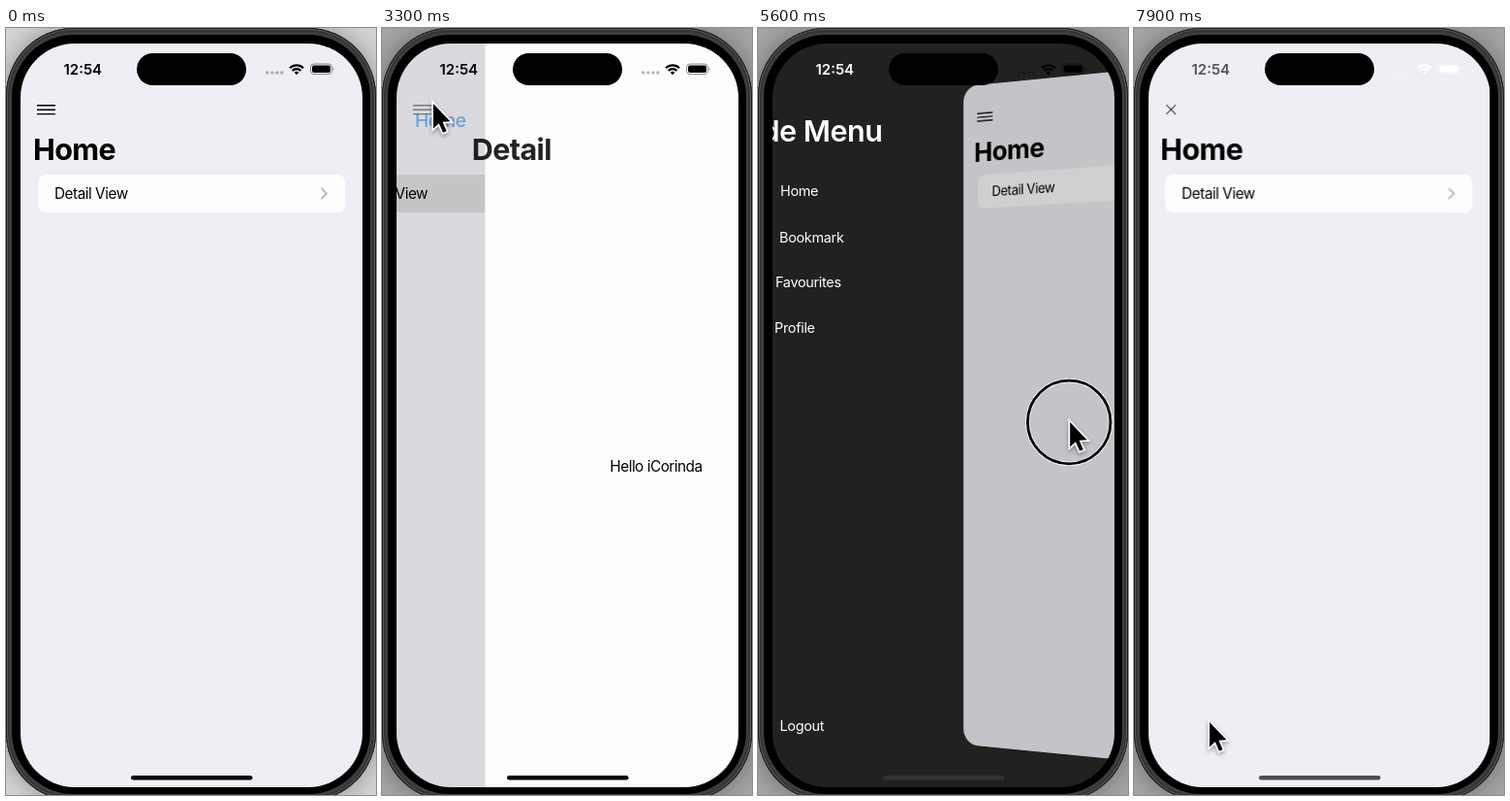
Animation of 382x790 px, one loop 8000 ms. Source, as an HTML page:

```html
<!DOCTYPE html>
<html lang="en">
<head>
<meta charset="utf-8">
<title>Side menu</title>
<style>
  html, body { margin: 0; width: 100%; height: 100%; overflow: hidden; }
  #stage { position: relative; width: 382px; height: 790px; overflow: hidden; }
  #stage > *, #screen > * { position: absolute; left: 0; top: 0; }
  svg { display: block; width: 382px; height: 790px; }
  text { font-family: Inter, "Liberation Sans", sans-serif; font-size: 15.3px; letter-spacing: -.03em; }
  .title { font-size: 30.5px; font-weight: 700; letter-spacing: -.02em; }
  #menu text { fill: #fff; font-size: 14.4px; letter-spacing: -.02em; }
  #menu .title { font-size: 30.5px; font-weight: 600; letter-spacing: -.015em; }
  #device { left: 0; top: 0; width: 382px; height: 796px; border-radius: 70px; background: #3d3e40;
    box-shadow: 0 0 28px rgba(0,0,0,.35), inset 0 0 0 1px #1c1c1e, inset 0 0 0 2px #59595b, inset 0 0 0 4px #333436; }
  #device div { position: absolute; left: 6px; top: 7px; width: 370px; height: 782px; border-radius: 64px; background: #000; }
  #screen { width: 382px; height: 790px; background: #20221f; clip-path: inset(16px 14px 8px 15px round 56px); }
  #page { transform-origin: 15px 399px; }
</style>
</head>
<body>
<div id="stage">
  <div id="device"><div></div></div>
  <div id="screen">
    <svg>
      <g id="menu" fill="#fff">
        <text class="title" x="27.5" y="116.5">Side Menu</text>
        <text x="74" y="173">Home</text>
        <text x="73" y="220.5">Bookmark</text>
        <text x="69" y="266.5">Favourites</text>
        <text x="68" y="314">Profile</text>
        <text x="73.5" y="724">Logout</text>
        <path d="M36 168L46 159.5L56 168V180.5H36ZM53.5 156h3.2v8l-3.2-3z"/>
        <path d="M32.5 167L46 155.5L59.5 167" fill="none" stroke="#fff" stroke-width="2.4" stroke-linecap="round"/>
        <rect x="43" y="170" width="6" height="9" fill="#20221f"/>
        <path d="M31 206Q38 201 44.8 206V227Q38 223 31 226ZM60 206Q53 201 46.2 206V227Q53 223 60 226Z"/>
        <path d="M43.5 273C36 267 31 262 31 256.5C31 251.5 35 249.5 37.5 249.5C40.5 249.5 42.5 251.5 43.5 253.5C44.5 251.5 46.5 249.5 49.5 249.5C52 249.5 56 251.5 56 256.5C56 262 51 267 43.5 273Z"/>
        <circle cx="43" cy="308.5" r="11.7" fill="none" stroke="#fff" stroke-width="2"/>
        <circle cx="43" cy="305.5" r="4.2"/>
        <path d="M34.5 316.5C36 311.5 50 311.5 51.5 316.5A11.5 11.5 0 0 1 34.5 316.5Z"/>
        <rect x="31" y="705" width="21" height="27" rx="4"/>
        <g fill="none" stroke-width="2" stroke-linecap="round" stroke-linejoin="round">
          <path d="M43 718.5H51" stroke="#20221f"/>
          <path d="M53 718.5H59.5M55.5 714l4.5 4.5-4.5 4.5" stroke="#fff"/>
        </g>
      </g>
    </svg>
    <svg id="page">
      <rect x="15" y="16" width="353" height="766" fill="#efeef4"/>
      <g id="content">
        <g id="list">
          <rect id="row" x="33" y="151" width="317" height="39" rx="8"/>
          <text x="50" y="176.3">Detail View</text>
          <path d="M326 165.5l5 5-5 5" fill="none" stroke="#b9b9bd" stroke-width="1.8" stroke-linecap="round" stroke-linejoin="round"/>
        </g>
        <rect id="dim" x="15" y="16" width="353" height="766"/>
        <g id="detail">
          <rect x="15" y="16" width="353" height="766" fill="#fdfdfd"/>
          <text x="191.5" y="456.5" text-anchor="middle">Hello iCorinda</text>
        </g>
        <text id="detailTitle" class="title" y="136">Detail</text>
        <g fill="none" stroke="#000" stroke-width="1.4">
          <path id="bars" d="M32 79.8h19M32 84.2h19M32 88.6h19"/>
          <path id="cross" d="M-7.5-7.5l15 15M7.5-7.5l-15 15"/>
          <path id="back" d="M30 77l-7 7 7 7" stroke="#007aff" stroke-width="2" stroke-linecap="round"/>
        </g>
        <text id="homeTitle" class="title">Home</text>
      </g>
      <rect id="shade" x="15" y="16" width="353" height="766"/>
    </svg>
    <svg>
      <text id="clock" x="79.3" y="47.8" text-anchor="middle" style="font-weight:600;font-size:15px;letter-spacing:0">12:54</text>
      <rect x="135" y="26" width="113" height="33" rx="16.5"/>
      <g id="status">
        <g opacity=".27"><circle cx="269.7" cy="46" r="1.8"/><circle cx="274.8" cy="46" r="1.8"/><circle cx="279.8" cy="46" r="1.8"/><circle cx="284.8" cy="46" r="1.8"/></g>
        <path d="M293 41.2a10 10 0 0 1 14 0M295.6 44a6.2 6.2 0 0 1 8.8 0" fill="none" stroke="currentColor" stroke-width="2.1"/>
        <path d="M300 48.2l-2.3-2.4a3.3 3.3 0 0 1 4.6 0z"/>
        <g opacity=".45"><rect x="314.5" y="37" width="22" height="10.6" rx="3.4" fill="none" stroke="currentColor"/><path d="M337.7 40.5q1.8 1.8 0 3.6z"/></g>
        <rect x="316" y="38.5" width="19" height="7.6" rx="2"/>
      </g>
      <rect id="bar" x="129" y="770" width="125.5" height="4.6" rx="2.3"/>
    </svg>
  </div>
  <svg>
    <g id="cursor">
      <g id="ring" fill="none">
        <circle r="42.8" stroke="#fff" stroke-width="4.6" opacity=".8"/>
        <circle r="42.8" stroke="#000" stroke-width="2.8"/>
      </g>
      <path d="M1 0V25.5L6.8 20.2L11 29.8L14.6 28.2L10.5 18.8L18.5 18.3Z" stroke="#fff" stroke-width="3.4" paint-order="stroke"
        style="filter:drop-shadow(0 2px 2px rgba(0,0,0,.35))"/>
    </g>
  </svg>
</div>
<script>
const LOOP = 8000, PUSH = 2060, POP = 3247;
const el = id => document.getElementById(id);
const set = (id, attrs) => { for (const k in attrs) el(id).setAttribute(k, attrs[k]); };
const clamp = v => Math.min(1, Math.max(0, v));
const mix = (a, b, k) => a + (b - a) * k;
const gray = v => { const n = Math.round(255 * v); return `rgb(${n},${n},${n})`; };

// keys: rows of [time, value, ...]; linear between rows
function at(t, keys) {
  const i = keys.findIndex(k => k[0] > t);
  if (i === 0) return keys[0].slice(1);
  if (i < 0) return keys[keys.length - 1].slice(1);
  const a = keys[i - 1], b = keys[i], k = (t - a[0]) / (b[0] - a[0]);
  return a.slice(1).map((v, j) => mix(v, b[j + 1], k));
}

// critically damped spring from 0 to 1
const spring = t => t <= 0 ? 0 : 1 - Math.exp(-.01826 * t) * (1 + .01826 * t);

const pointer = [[300, 188.5, 518], [450, 188.5, 518], [800, 150, 300], [1050, 150, 300], [1800, 141, 181],
  [2850, 141, 181], [3150, 52, 78], [3700, 52, 78], [4000, 209, 407], [4350, 209, 407], [4700, 145, 407],
  [4820, 145, 407], [5000, 212, 407], [5600, 321, 406], [5700, 338, 406], [5800, 350, 405],
  [6720, 350, 405], [7480, 77, 715]];
const presses = [[1890, 1990], [3140, 3240], [3990, 4150], [4690, 5780], [7490, 7640]];
const opening = [[4820, 0], [4900, .1], [5000, .259], [5600, .7725], [5700, .86], [5800, .93], [5900, .965],
  [6000, .985], [6300, 1], [7620, 1], [7700, .62], [7800, .12], [7880, -.003]];
const clockTone = [[5150, 0], [5350, 1], [7700, 1], [8000, 0]];
const iconTone = [[5650, 0], [5900, 1]];
const barTone = [[4820, 0], [4920, .23], [5600, .2], [7800, .2], [7900, .3], [8000, .1]];
const crossSize = [[5750, 0], [5950, 1], [7700, 1], [7900, .65], [8000, .45]];

function drawPush(t) {
  const popping = t >= POP;
  const q = popping ? 1 - spring(t - POP) : spring(t - PUSH);
  const rest = 1 - q, lit = t < 1900 ? 0 : popping ? q : 1;
  set("list", { transform: `translate(${-106 * q})` });
  set("row", { fill: `rgb(${mix(253, 203, lit)},${mix(253, 202, lit)},${mix(253, 207, lit)})` });
  set("dim", { opacity: .12 * q });
  set("detail", { transform: `translate(${353 * rest})` });
  set("detailTitle", { x: 28 + rest * (popping ? 250 : 402), opacity: popping ? Math.sqrt(q) : 1 });
  set("back", { opacity: clamp(5 * q - 4) });
  const hue = Math.sqrt(q);
  set("homeTitle", {
    x: mix(28, 36, q), y: mix(136, 89.5, q),
    fill: `rgb(0,${122 * hue},${255 * hue})`,
    opacity: 1 - (popping ? 2.6 : .8) * q * rest,
    style: `font-size:${mix(30.5, 15.3, q)}px;font-weight:${Math.round(mix(700, 400, q))}`
  });
  return Math.pow(rest, .6);
}

function drawTilt(t, barsAlpha) {
  const [p] = at(t, opening), [cross] = at(t, crossSize);
  const s = 1 - .149 * p, c = .00031 * p, dx = 255 * p;
  const page = el("page").style;
  page.transform = `matrix3d(${s * (1 - .08 * p) - dx * c},0,0,${-c},0,${s},0,0,0,0,1,0,${dx},0,0,1)`;
  page.clipPath = `inset(16px 14px 8px 15px round ${Math.max(0, 23 * p)}px)`;
  set("content", { transform: `translate(0 ${-39.5 * p})` });
  set("shade", { opacity: Math.max(0, .235 * p) });
  set("menu", { transform: `translate(${-225 * (1 - p)})` });
  set("bars", { opacity: barsAlpha * clamp(1 - 3 * cross) });
  set("cross", { transform: `translate(39 84) scale(${cross})`, opacity: cross ? 1 : 0 });
}

function draw() {
  const t = performance.now() % LOOP;
  el("stage").style.background = t < 2000 ? "#d6d6d7" : "#a6a6a7";
  drawTilt(t, drawPush(t));
  set("clock", { fill: gray(at(t, clockTone)[0]) });
  const icons = gray(at(t, iconTone)[0]);
  set("status", { fill: icons, color: icons });
  set("bar", { fill: gray(at(t, barTone)[0]) });
  const shown = t >= 300 && t < 6150 || t >= 6750;
  set("cursor", { transform: `translate(${at(t, pointer)})`, opacity: +shown });
  set("ring", { opacity: +presses.some(([a, b]) => t >= a && t < b) });
  requestAnimationFrame(draw);
}
draw();
</script>
</body>
</html>
```
